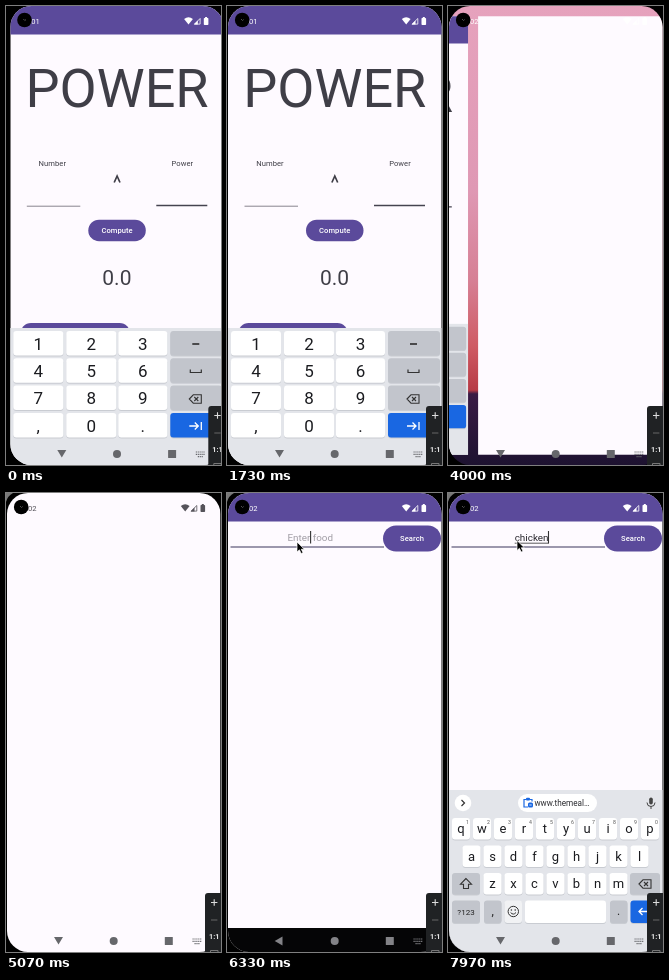
Animation of 215 by 459 pixels, one loop 8000 ms. Source, as an HTML page:

```html
<!DOCTYPE html>
<html lang="en">
<head>
<meta charset="utf-8">
<title>Phone demo</title>
<style>
  html, body { margin: 0; width: 100%; height: 100%; overflow: hidden; background: #000; }
  svg { display: block; width: 100vw; height: 100vh; }
  text { font-family: Roboto, Arial, sans-serif; white-space: pre; }
</style>
</head>
<body>
<svg id="stage" viewBox="0 0 215 459" preserveAspectRatio="none"></svg>
<script>
const LOOP = 8000;
const PURPLE = '#5b4a9b', PAPER = '#fefaff', INK = '#3f3e47', KEY_BG = '#e3e5ea', KEY_GRAY = '#c2c5cc', BLUE = '#1967e2';

const rect = (x, y, w, h, fill, r = 0) => `<rect x="${x}" y="${y}" width="${w}" height="${h}" rx="${r}" fill="${fill}"/>`;
const circle = (x, y, r, fill) => `<circle cx="${x}" cy="${y}" r="${r}" fill="${fill}"/>`;
const line = (d, color, width = 1) => `<path d="${d}" fill="none" stroke="${color}" stroke-width="${width}"/>`;
const shape = (d, fill) => `<path d="${d}" fill="${fill}"/>`;
const text = (x, y, size, str, fill = INK, extra = '') =>
  `<text x="${x}" y="${y}" font-size="${size}" fill="${fill}" text-anchor="middle" ${extra}>${str}</text>`;
const label = (x, y, str) => text(x, y, 7.6, str, INK, 'letter-spacing=".05"');
const button = (x, y, w, h, str) => rect(x, y, w, h, PURPLE, h / 2)
  + text(x + w / 2, y + h / 2 + 2.9, 7.6, str, '#fff', 'font-weight="500" letter-spacing=".05"');
const group = (id, body) => `<g id="${id}">${body}</g>`;
const key = (x, y, w, h, fill = '#fff') => rect(x, y + 1, w, h, '#c9ccd2', 3) + rect(x, y, w, h, fill, 3);

const backspace = (x, y) =>
  line(`M${x - 6} ${y}l4 -4.2h8v8.4h-8z`, '#333', 1.1) + line(`M${x - 1} ${y - 2}l4 4m0 -4l-4 4`, '#333', 1.1);

function numberPad() {
  const columns = [[4, 50], [57, 50], [109, 49], [161, 52]];
  const rows = ['123', '456', '789', ',0.'];
  let out = rect(0, 322, 215, 137, KEY_BG);
  rows.forEach((row, r) => {
    const y = 325 + r * 27.3;
    columns.forEach(([x, w], c) => {
      const fill = c < 3 ? '#fff' : r < 3 ? KEY_GRAY : BLUE;
      out += key(x, y, w, 24.5, fill);
      if (c < 3) out += text(x + w / 2, y + 18.6, 17, row[c], '#1b1c20');
    });
  });
  out += line('M183 338h7', '#222', 1.3) + line('M181 363.5v3h11v-3', '#333', 1.2) + backspace(186, 393);
  out += line('M180 420h9m-3.5 -3.5l3.5 3.5l-3.5 3.5M192 416v8', '#fff', 1.3);
  return out;
}

function calculator() {
  return rect(1, 0, 214, 459, PAPER) + rect(1, 0, 214, 28.5, PURPLE)
    + text(107.8, 100.7, 54, 'POWER')
    + label(43, 160, 'Number') + label(173, 160, 'Power')
    + line('M104.9 176.5L107.8 170L110.7 176.5', INK, 1.7)
    + line('M17.5 200.2H71', '#88848e', 1) + line('M147 199.5H198', '#454350', 1.3)
    + group('powerCaret', line('M147.6 180V193.5', '#4a4758', 1.1))
    + button(79, 213.7, 57.5, 21.5, 'Compute')
    + text(107.6, 278.6, 21, '0.0')
    + rect(11, 317, 110, 22, PURPLE, 10.7)
    + numberPad();
}

function letterKeyboard() {
  let out = rect(0, 297, 215, 162, KEY_BG);
  out += circle(15, 310, 8.3, '#fff') + line('M13.5 307l3 3l-3 3', '#333', 1.2);
  out += rect(70, 301, 79, 18, '#fff', 9);
  out += line('M78 306.5h-2v7.5h4M82 306.5h2v2', BLUE, 1.2) + rect(78, 304.8, 4, 2.6, BLUE, 1)
    + rect(80, 309.5, 5, 5, BLUE, 1.5) + line('M81.3 312h2.4', '#fff', .8);
  out += text(114, 313, 8.2, 'www.themeal…', '#2b2c30');
  out += rect(201.2, 304.5, 3.6, 7, '#444', 1.8) + line('M199 309.5a4 4 0 0 0 8 0M203 313.5v2.5', '#444', 1);
  const letters = (row, left, y) => [...row].forEach((ch, i) => {
    const x = left + i * 21;
    out += key(x - 9, y, 18, 21.5) + text(x, y + 15, 13, ch, '#1b1c20');
    if (row.length === 10) out += text(x + 6.4, y + 6.3, 5.2, (i + 1) % 10, '#555');
  });
  letters('qwertyuiop', 13, 325);
  letters('asdfghjkl', 23.5, 352.5);
  letters('zxcvbnm', 44.5, 380);
  out += key(4, 380, 28, 21.5, KEY_GRAY) + line('M18 385.5l-5.5 5.7h3v4.3h5v-4.3h3z', '#333', 1.1);
  out += key(182, 380, 30, 21.5, KEY_GRAY) + backspace(197, 391);
  out += key(4, 407.5, 28, 22.5, KEY_GRAY) + text(18, 421.7, 8, '?123', '#222');
  out += key(36, 407.5, 17.5, 22.5, KEY_GRAY) + text(44.7, 422, 12, ',', '#222');
  out += key(56.5, 407.5, 17.5, 22.5, '#f1f2f4') + `<circle cx="65.3" cy="418.5" r="5.2" fill="none" stroke="#333"/>`
    + circle(63.4, 417, .8, '#333') + circle(67.2, 417, .8, '#333') + line('M62.6 419.5q2.7 3.2 5.4 0', '#333');
  out += key(77, 407.5, 81, 22.5) + key(162, 407.5, 17.5, 22.5, KEY_GRAY) + text(170.7, 422, 12, '.', '#222');
  out += key(182.5, 407.5, 30.5, 22.5, BLUE) + line('M203 415v3.5h-12m3.5 -3.5l-3.5 3.5l3.5 3.5', '#fff', 1.3);
  return out;
}

function foodSearch() {
  return rect(1, 0, 214, 459, PAPER) + rect(1, 0, 214, 28.5, PURPLE) + rect(0, 435, 215, 24, '#050506')
    + text(83.2, 48, 9.9, 'Enter food', '#a19da5', 'id="hint"')
    + text(83.6, 47.5, 9.9, '', '#29272e', 'id="query"')
    + line('M3.5 54H157', '#3d365c', 1.2)
    + `<path id="composing" fill="none" stroke="#333" stroke-width=".8"/>`
    + group('queryCaret', line('M0 38V50.5', '#333', 1.1))
    + button(156, 32.5, 58, 26, 'Search');
}

const statusIcons = text(25.4, 18, 7.6, '', 'currentColor', 'id="clock"')
  + shape('M174.8 13Q179.2 9.6 183.6 13L179.2 18.6z', 'currentColor')
  + line('M185.2 18.1L190.8 12.5V18.1z', 'currentColor', .8) + shape('M184.5 18.5L188.5 14.5V18.5z', 'currentColor')
  + rect(194.5, 12, 4.6, 7, 'currentColor', .8) + rect(195.8, 11, 2, 1.5, 'currentColor');

const navIcons = group('hideKeys', shape('M48 444h9l-4.5 7.5z', 'currentColor'))
  + group('back', shape('M55.5 443.5v9l-7.8 -4.5z', 'currentColor'))
  + circle(107.7, 448, 4, 'currentColor') + rect(158.8, 444, 8, 8, 'currentColor', .5)
  + line('M186.5 446h9M186.5 448.3h9M188.5 450.6h5', 'currentColor', 1.2).replace('/>', ' stroke-dasharray="1.2 .7"/>');

const zoomBar = rect(199, 400, 30, 70, '#202224', 3)
  + line('M205 409.5h6.4M208.2 406.3v6.4', '#ddd', 1.1) + line('M205 427h6.4', '#666', 1)
  + text(208.2, 446, 7.2, '1:1', '#eee', 'font-weight="700"') + line('M204.5 459v-1.5h7.5v1.5', '#777');

document.getElementById('stage').innerHTML = `
  <defs>
    <clipPath id="screenClip"><rect x="1" y="0" width="213.5" height="459" rx="21"/></clipPath>
    <linearGradient id="sky" x1="0" y1="0" x2="0" y2="1">
      <stop offset="0" stop-color="#e6a2bd"/><stop offset=".4" stop-color="#df98b4"/>
      <stop offset=".6" stop-color="#d67f94"/><stop offset=".74" stop-color="#cf5b64"/>
      <stop offset=".837" stop-color="#b73a45"/><stop offset=".845" stop-color="#3a1b45"/>
      <stop offset="1" stop-color="#1d1230"/>
    </linearGradient>
  </defs>
  <rect width="215" height="459" fill="#000"/>
  ${group('backdrop', shape('M0 0H7Q1.5 3 0 9z', '#777'))}
  <g id="device">
    <g clip-path="url(#screenClip)">
      ${group('wallpaper', rect(0, 0, 215, 459, 'url(#sky)'))}
      ${group('calculator', calculator())}
      ${group('splash', rect(1, 0, 213.5, 459, PAPER))}
      ${group('search', foodSearch())}
      ${group('letters', letterKeyboard())}
      ${group('status', statusIcons)}
      ${group('nav', navIcons)}
    </g>
    ${circle(15.2, 14, 7.3, '#000')}
    ${line('M14 13l1.5 1.5l1.2 -1', '#666', .8)}
    ${zoomBar}
  </g>
  ${group('pointer', `<path d="M0 0V10L2.4 7.8L4.2 11.5L6 10.7L4.3 7.2H7.3z" fill="#000" stroke="#fff" stroke-width=".7"/>`)}`;

const el = Object.fromEntries([...document.querySelectorAll('[id]')].map(node => [node.id, node]));
const show = (node, on) => node.setAttribute('display', on ? 'inline' : 'none');
const move = (node, value) => node.setAttribute('transform', value);
const clamp = v => Math.min(1, Math.max(0, v));
const span = (t, start, length) => clamp((t - start) / length);
const easeOut = u => 1 - (1 - u) ** 3;
const mix = (a, b, u) => a + (b - a) * u;

// Cubic bezier (.6, 0, .4, 1), solved by bisection.
function swift(u) {
  let lo = 0, hi = 1;
  for (let i = 0; i < 24; i++) {
    const s = (lo + hi) / 2, x = 1.8 * (1 - s) ** 2 * s + 1.2 * (1 - s) * s * s + s ** 3;
    if (x < u) lo = s; else hi = s;
  }
  return lo * lo * (3 - 2 * lo);
}

const SWITCH = 3630, SETTLED = SWITCH + 600, LAUNCH = 5130, KEYS_IN = 6570, TYPING = 7080, KEY_GAP = 120;
const WORD = 'chicken', CARD_STEP = 214.5;

function placeCard(node, dx, scale) {
  move(node, `translate(${107.5 + dx} 229.5) scale(${scale}) translate(-107.5 -229.5)`);
}

function render(t) {
  move(el.device, `translate(${3.3 * (1 - easeOut(span(t, 30, 500)))} 0)`);

  const slide = swift(span(t, SWITCH + 50, 450));
  const scale = 1 - .05 * swift(span(t, SWITCH, 317)) + .05 * swift(span(t, SWITCH + 283, 317));
  placeCard(el.calculator, -CARD_STEP * slide, scale);
  placeCard(el.splash, CARD_STEP * (1 - slide), scale);
  show(el.wallpaper, t >= SWITCH && t < SETTLED);
  show(el.calculator, t < SETTLED);
  show(el.splash, t >= SWITCH && t < LAUNCH);
  show(el.backdrop, t >= 4900);
  const phase = t % 1000;
  show(el.powerCaret, phase >= 120 && phase < 620);

  const launched = t >= LAUNCH;
  show(el.search, launched);
  const typed = Math.floor(clamp((t - TYPING) / (KEY_GAP * WORD.length)) * WORD.length);
  show(el.hint, typed === 0);
  el.query.textContent = WORD.slice(0, typed);
  const half = typed ? el.query.getComputedTextLength() / 2 : 0;
  el.composing.setAttribute('d', typed ? `M${83.6 - half} 50.2H${83.6 + half}` : '');
  move(el.queryCaret, `translate(${83.6 + half} 0)`);
  show(el.queryCaret, typed > 0 || (t - LAUNCH) % 1000 < 500 || t > 6100 && t < 6600);

  const rise = easeOut(span(t, KEYS_IN, 280));
  show(el.letters, t >= KEYS_IN);
  move(el.letters, `translate(0 ${162 * (1 - rise)})`);

  el.clock.textContent = t < 2500 ? ':01' : ':02';
  el.status.style.color = t >= SETTLED && !launched ? '#55535a' : '#fff';
  const bareNav = launched && rise < .2;
  show(el.back, bareNav);
  show(el.hideKeys, !bareNav);
  el.nav.style.color = bareNav ? '#838387' : '#66676b';

  const arrive = easeOut(span(t, 5850, 400));
  const settle = span(t, 6700, 500);
  show(el.pointer, t >= 5850);
  move(el.pointer, `translate(${mix(-8, 70, arrive) - settle} ${mix(90, 49, arrive) - 1.5 * settle})`);
}

const start = performance.now();
function tick() {
  render((performance.now() - start) % LOOP);
  requestAnimationFrame(tick);
}
tick();
</script>
</body>
</html>
```
